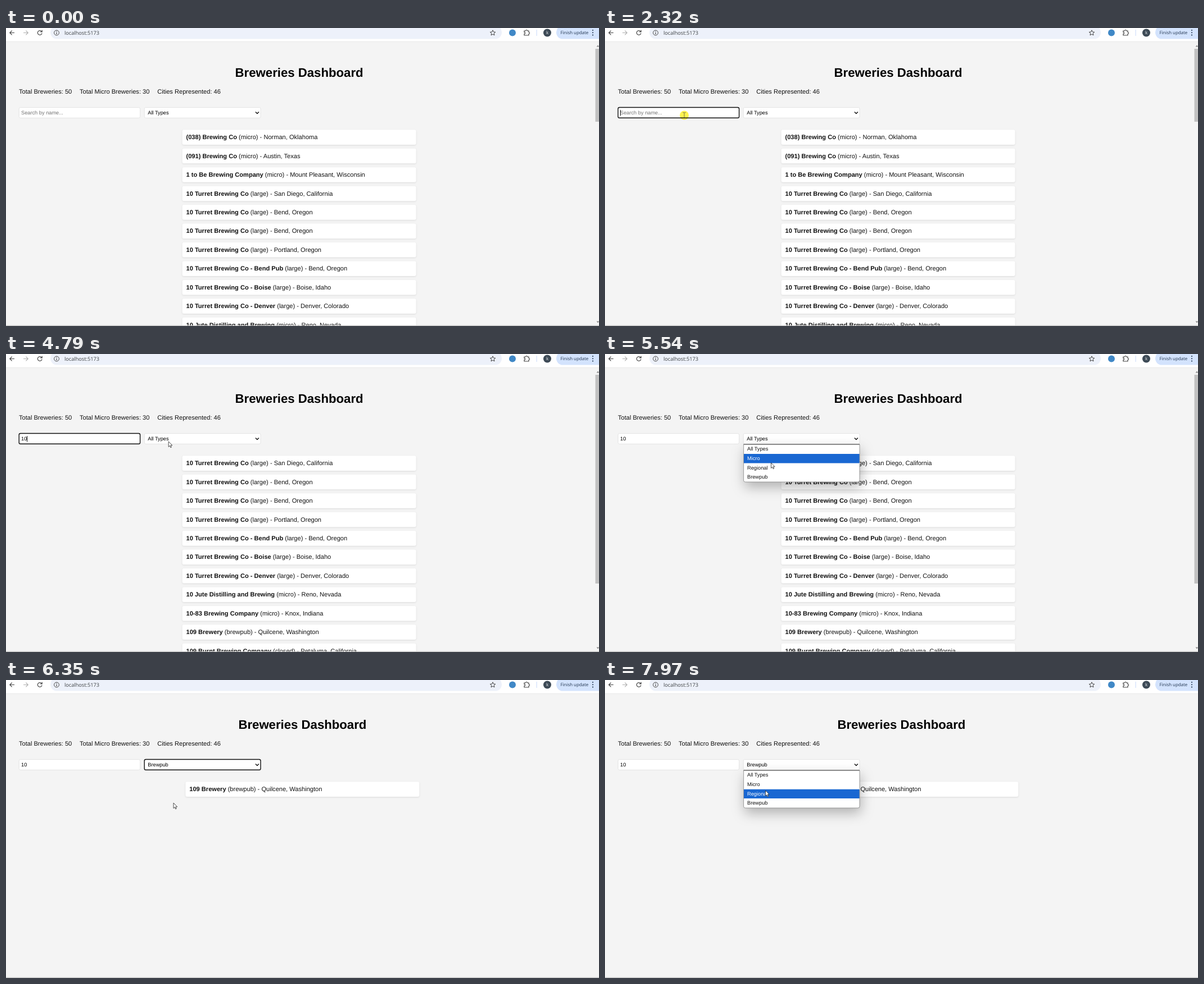
These frames come from a looping animation (1055x531 px, 8000 ms). An HTML page:

```html
<!DOCTYPE html>
<html lang="en">
<head>
<meta charset="utf-8">
<title>Breweries Dashboard</title>
<style>
  html, body { margin: 0; width: 100%; height: 100%; overflow: hidden; background: #f4f4f4; }
  svg { display: block; width: 1055px; height: 531px; text-rendering: geometricPrecision;
        font: 11.09px "Liberation Sans", Arial, sans-serif; }
  .ui { font-family: "Open Sans", "Noto Sans", sans-serif; }
  .field { font-size: 9.24px; }
  .bold { font-weight: 700; }
  .title { font-size: 22.18px; font-weight: 700; text-anchor: middle; }
  .card { fill: #fff; filter: drop-shadow(0 1.4px 1.4px rgba(0, 0, 0, .1)); }
  .menu { filter: drop-shadow(2px 9px 11px rgba(0, 0, 0, .28)); }
  .click { fill: #fff450; mix-blend-mode: multiply; }
  .line { fill: none; stroke: #444; stroke-width: 1.2; }
</style>
</head>
<body>
<svg viewBox="0 0 1055 531">
  <g id="page"></g>
  <g id="browser">
    <rect width="1055" height="24" fill="#fff"/>
    <rect y="23.8" width="1055" height=".8" fill="#e4e4e4"/>
    <rect x="79" y="-4" width="803" height="23.5" rx="11.5" fill="#edf1fa"/>
    <path class="line" d="M15 8.5H7M10.6 4.6 6.8 8.5 10.6 12.4"/>
    <path class="line" d="M31 8.5H39M35.4 4.6 39.2 8.5 35.4 12.4" style="stroke:#b0b0b0"/>
    <path class="line" d="M63.2 6A3.9 3.9 0 1 0 64 9.4M64.2 3.8V6.8H61.2"/>
    <circle class="line" cx="90" cy="8.5" r="4.4" style="stroke-width:1"/>
    <path class="line" d="M90 8V11M90 5.8V7"/>
    <text class="ui" x="104" y="11.8" font-size="9.2" fill="#3c4043">localhost:5173</text>
    <path class="line" style="stroke-width:1" d="M866 3.8 867.4 7 870.8 7.3 868.2 9.5 869 12.9 866 11.1 863 12.9 863.8 9.5 861.2 7.3 864.6 7Z"/>
    <circle cx="901" cy="8.5" r="6" fill="#4088c6"/>
    <path class="line" d="M922 5H924.6A1.5 1.5 0 0 1 927.6 5H930V7.5A1.5 1.5 0 0 1 930 10.5V13H922V10.6A1.6 1.6 0 0 0 922 7.4Z"/>
    <rect x="943.6" y="3" width="1" height="11" fill="#c9dafa"/>
    <circle cx="963" cy="8.5" r="7" fill="#3d4a56"/>
    <text class="ui" x="963" y="11.3" font-size="8" fill="#e4e8ec" text-anchor="middle">k</text>
    <rect x="979" y="-4" width="90" height="23.5" rx="11.5" fill="#d3e3fd"/>
    <text class="ui" x="986.5" y="11.4" font-size="7.9" fill="#20344f">Finish update</text>
    <path d="M1044 4V4.01M1044 8.3V8.31M1044 12.6V12.61" stroke="#20344f" stroke-width="2.1" stroke-linecap="round"/>
    <rect y="529.8" width="1055" height="1.2" fill="#c2c2c2"/>
  </g>
  <g id="pointer"></g>
</svg>
<script>
const LOOP = 8000, FRAME = 67.1, PHASE = 36;
const TYPE_1 = 3070, TYPE_10 = 3530, FOCUS = 2320, FILTER = 6350;
const OPENINGS = [[5140, FILTER], [7290, LOOP]];
const CLICKS = [[FOCUS, 2520], [5140, 5340], [6150, FILTER], [7290, 7500]];
const OPTIONS = ["All Types", "Micro", "Regional", "Brewpub"];
const MENU_TOP = 161, OPTION_HEIGHT = 16.7;

const turret = (place, branch = "") => ["10 Turret Brewing Co" + branch, "large", place];
const BREWERIES = [
  ["(038) Brewing Co", "micro", "Norman, Oklahoma"],
  ["(091) Brewing Co", "micro", "Austin, Texas"],
  ["1 to Be Brewing Company", "micro", "Mount Pleasant, Wisconsin"],
  turret("San Diego, California"),
  turret("Bend, Oregon"),
  turret("Bend, Oregon"),
  turret("Portland, Oregon"),
  turret("Bend, Oregon", " - Bend Pub"),
  turret("Boise, Idaho", " - Boise"),
  turret("Denver, Colorado", " - Denver"),
  ["10 Jute Distilling and Brewing", "micro", "Reno, Nevada"],
  ["10-83 Brewing Company", "micro", "Knox, Indiana"],
  ["109 Brewery", "brewpub", "Quilcene, Washington"],
  ["109 Burnt Brewing Company", "closed", "Petaluma, California"]
];

// Pointer path: time, x, y
const PATH = [
  [640, 874, 500], [710, 600, 342], [780, 412, 242], [850, 351, 209],
  [1113, 351, 209], [1450, 240, 122], [1580, 190, 103], [1750, 136, 126], [1920, 141, 155.5],
  [4043, 141, 155.5], [4400, 215, 158], [4600, 280, 164], [4790, 293, 152.5],
  [5273, 293, 152.5], [5540, 295.5, 194], [5880, 298, 219],
  [6613, 298, 219], [7020, 271.5, 151.5],
  [7432, 271.5, 151.5], [7950, 285.5, 197]
];

const during = (t, spans) => spans.some(([from, to]) => t >= from && t < to);
const text = (x, y, content, attrs = "") => `<text x="${x}" y="${y}" ${attrs}>${content}</text>`;
const rect = (x, y, w, h, attrs) => `<rect x="${x}" y="${y}" width="${w}" height="${h}" ${attrs}/>`;

function pointerAt(time) {
  const t = PHASE + Math.floor((time - PHASE) / FRAME) * FRAME + 1;
  const next = PATH.findIndex(point => point[0] > t);
  if (next < 0) return PATH.at(-1).slice(1);
  if (next === 0) return PATH[0].slice(1);
  const [t0, x0, y0] = PATH[next - 1], [t1, x1, y1] = PATH[next];
  const p = (t - t0) / (t1 - t0);
  return [x0 + (x1 - x0) * p, y0 + (y1 - y0) * p];
}

function box(x, w, focused) {
  const border = focused ? 'stroke="#101010" stroke-width="1.4"' : 'stroke="#dcdcdc" stroke-width=".7"';
  return rect(x, 141.5, w, 18.8, `rx="2.6" fill="#fff" ${border}`);
}

function searchField(t, query) {
  const focused = t >= FOCUS && t < 5140;
  const lastInput = t >= TYPE_10 ? TYPE_10 : t >= TYPE_1 ? TYPE_1 : FOCUS;
  const caretOn = focused && (t - lastInput) % 1060 < 550;
  const label = query ? text(27, 153.5, query, 'class="field"')
                      : text(27, 153.5, "Search by name...", 'class="field" fill="#757575"');
  const caret = caretOn ? rect(26.9 + query.length * 5.14, 146, .9, 10.6, 'fill="#000"') : "";
  return box(23.2, 215.4, focused) + label + caret;
}

function typeSelect(t, selected, open) {
  return box(246.2, 206.8, t >= FILTER && !open) +
    text(252.3, 153.5, OPTIONS[selected], 'class="field"') +
    '<path d="M443.9 149.4 446.9 152.4 449.9 149.4" fill="none" stroke="#111" stroke-width="1.4"/>';
}

function menu(selected, pointerY) {
  const hovered = pointerY < MENU_TOP ? selected : Math.min(3, Math.floor((pointerY - MENU_TOP) / OPTION_HEIGHT));
  const shape = "M246.6 161H453V225A3 3 0 0 1 450 228H249.6A3 3 0 0 1 246.6 225Z";
  const rows = OPTIONS.map((name, i) => {
    const y = MENU_TOP + i * OPTION_HEIGHT, active = i === hovered;
    return (active ? rect(247, y + .3, 205.8, OPTION_HEIGHT - .3, 'rx=".5" fill="#1967d2"') : "") +
      text(253, 172.4 + i * 16.55, name, `class="field" fill="${active ? "#fff" : "#111"}"`);
  }).join("");
  return `<path class="menu" d="${shape}" fill="#fff"/>${rows}
    <path d="${shape}" fill="none" stroke="#777" stroke-width=".7"/>${rect(246.6, 160.5, 206.4, 1, 'fill="#555"')}`;
}

function brewery([name, type, place], i, centre) {
  const y = 181.3 + i * 33.45, x = centre - 208;
  return rect(x, y, 416, 26.6, 'class="card" rx="3"') +
    text(x + 6.9, y + 16.9, `<tspan class="bold">${name}</tspan> (${type}) - ${place}`, 'fill="#111"');
}

function scrollbar(bottom) {
  return rect(1048.5, 37, 8, bottom - 37, 'fill="#c1c1c1"') +
    '<path d="M1050.5 33.5 1053 30.5 1055.5 33.5ZM1050.5 522.5 1053 525.5 1055.5 522.5Z" fill="#8a8a8a"/>';
}

function pageAt(t) {
  const query = t >= TYPE_10 ? "10" : t >= TYPE_1 ? "1" : "";
  const filtered = t >= FILTER, selected = filtered ? 3 : 0;
  const open = during(t, OPENINGS);
  const centre = filtered ? 527.4 : 521.6;
  const rows = BREWERIES.filter(([name, type]) => name.includes(query) && (!filtered || type === "brewpub"));
  return rect(0, 0, 1055, 531, 'fill="#f4f4f4"') +
    text(centre, 87.2, "Breweries Dashboard", 'class="title"') +
    text(23, 117.2, "Total Breweries: 50", 'fill="#111"') +
    text(131, 117.2, "Total Micro Breweries: 30", 'fill="#111"') +
    text(269.2, 117.2, "Cities Represented: 46", 'fill="#111"') +
    searchField(t, query) + typeSelect(t, selected, open) +
    rows.slice(0, 11).map((row, i) => brewery(row, i, centre)).join("") +
    (filtered ? "" : scrollbar([167, 170, 409][query.length])) +
    (open ? menu(selected, pointerAt(t)[1]) : "");
}

function pointerShape(t) {
  if (t < PATH[0][0]) return "";
  const [x, y] = pointerAt(t);
  const overSearch = x > 23 && x < 239 && y > 141 && y < 161;
  const shape = overSearch
    ? '<path d="M-2.8-4.8H-.8L0-4.2.8-4.8H2.8M0-4.2V4.2M-2.8 4.8H-.8L0 4.2.8 4.8H2.8" fill="none" stroke="#444" stroke-width=".7"/>'
    : '<path d="M0 0V9.6L2.2 7.5 3.7 10.9 5.2 10.2 3.7 7H6.7Z" fill="#fff" stroke="#222" stroke-width=".8"/>';
  const click = during(t, CLICKS) ? `<circle class="click" cx="${x}" cy="${y}" r="8"/>` : "";
  return `${click}<g transform="translate(${x} ${y})">${shape}</g>`;
}

const shown = {};
function update(id, markup) {
  if (shown[id] === markup) return;
  shown[id] = markup;
  document.getElementById(id).innerHTML = markup;
}

function draw() {
  const t = performance.now() % LOOP;
  update("page", pageAt(t));
  update("pointer", pointerShape(t));
  requestAnimationFrame(draw);
}
draw();
</script>
</body>
</html>
```
